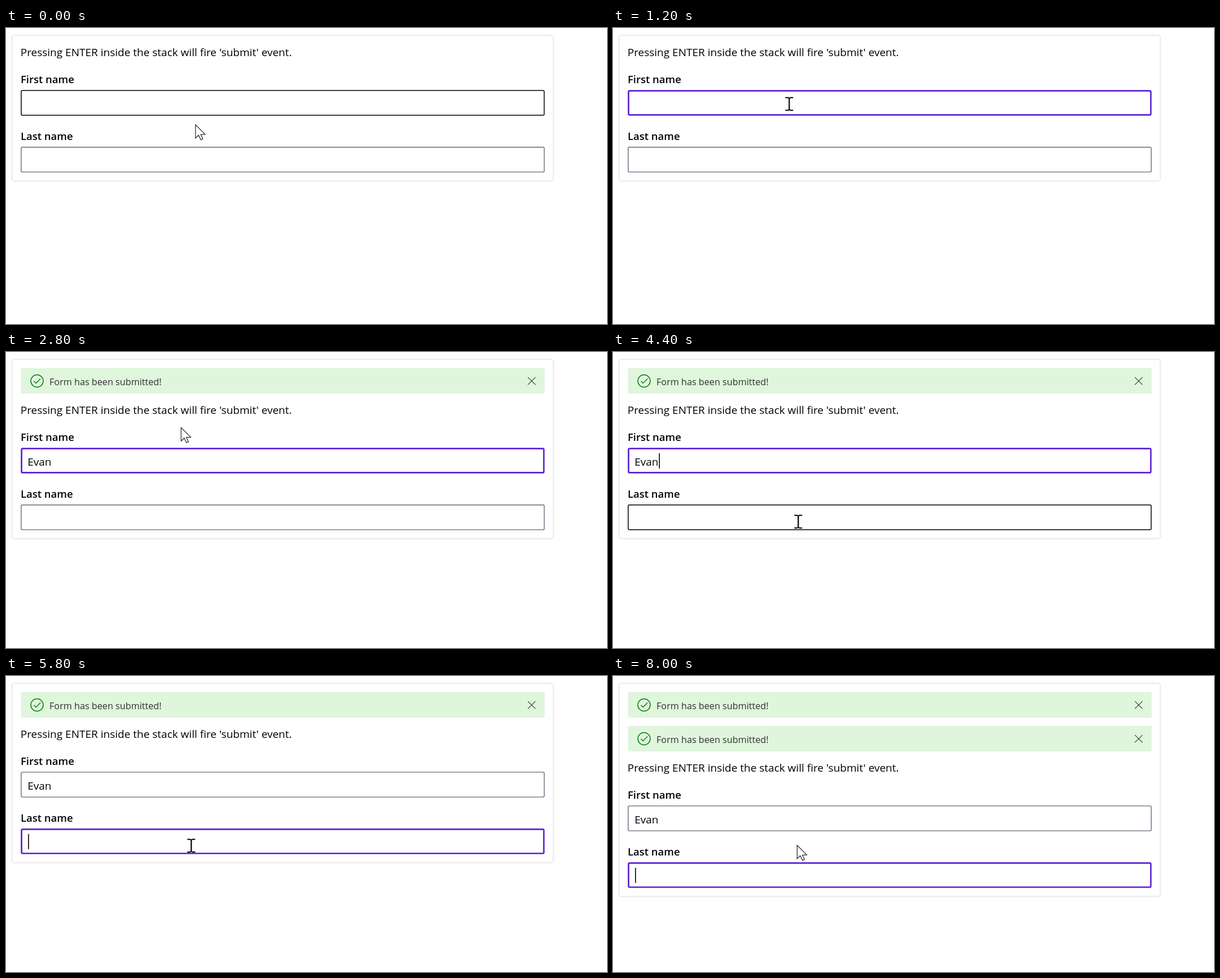
These frames come from a looping animation (1065x526 px, 8.2 s). An HTML page with a canvas:

```html
<!DOCTYPE html>
<html lang="en">
<head>
<meta charset="utf-8">
<title>Form submit</title>
<style>
  html, body { margin: 0; width: 100%; height: 100%; overflow: hidden; background: #fff; }
  canvas { display: block; }
</style>
</head>
<body>
<canvas id="stage" width="1065" height="526"></canvas>
<script>
const ctx = document.getElementById('stage').getContext('2d');
const LOOP = 8200, STEP = 200, ROW = 60;
const FAMILY = '"Open Sans", "Noto Sans", sans-serif';
const BODY = `19px ${FAMILY}`;
const LABEL = `600 18.5px ${FAMILY}`;
const NOTICE = `16.2px ${FAMILY}`;
const BORDER = {
  idle: ['#68667a', 1.4],
  hover: ['#000', 1.5],
  focus: ['#5b21d4', 2.7]
};
const FIRST_NAME = 'Evan';

// Pointer hot spot: [time, x, y]
const pointerPath = [
  [0, 335.5, 171.5], [200, 324, 152], [400, 314, 139], [600, 310, 134],
  [3600, 310, 134], [3800, 313, 195], [4000, 320, 265],
  [4200, 326, 339.5], [4400, 326, 300.5]
];
const caretToggles = [800, 1200, 1600, 2800, 3200, 3800, 4400, 4800,
  5000, 5400, 5800, 6400, 6800, 7400, 8000];

function pointerAt(t) {
  const next = pointerPath.findIndex(p => p[0] > t);
  if (next < 0) return pointerPath.at(-1).slice(1);
  const [t0, x0, y0] = pointerPath[next - 1];
  const [t1, x1, y1] = pointerPath[next];
  const k = (t - t0) / (t1 - t0);
  return [x0 + (x1 - x0) * k, y0 + (y1 - y0) * k];
}

function text(string, x, y, font, color = '#000') {
  ctx.font = font;
  ctx.fillStyle = color;
  ctx.fillText(string, x, y);
}

function line(points, color, width, closed) {
  ctx.beginPath();
  points.forEach(([x, y]) => ctx.lineTo(x, y));
  if (closed) ctx.closePath();
  ctx.strokeStyle = color;
  ctx.lineWidth = width;
  ctx.stroke();
}

function box(x, y, w, h, radius, color, width) {
  ctx.beginPath();
  ctx.roundRect(x + width / 2, y + width / 2, w - width, h - width, radius);
  ctx.strokeStyle = color;
  ctx.lineWidth = width;
  ctx.stroke();
}

function notice(y) {
  ctx.fillStyle = '#dff6dd';
  ctx.fillRect(26.5, y, 928, 45.5);
  const mid = y + 23;
  ctx.beginPath();
  ctx.arc(55, mid, 11, 0, Math.PI * 2);
  ctx.strokeStyle = '#107c10';
  ctx.lineWidth = 1.5;
  ctx.stroke();
  line([[49.5, mid + 0.3], [53.2, mid + 4], [61, mid - 4]], '#107c10', 1.5);
  text('Form has been submitted!', 77, y + 30, NOTICE, '#323130');
  line([[924.8, mid - 6.7], [938.2, mid + 6.7]], '#3b3a39', 1.2);
  line([[938.2, mid - 6.7], [924.8, mid + 6.7]], '#3b3a39', 1.2);
}

function field(label, y, state, value, caret) {
  text(label, 26, y + 98, LABEL);
  box(26.2, y + 110.2, 928.2, 45.6, 2, ...BORDER[state]);
  text(value, 38.2, y + 142, BODY);
  if (caret) {
    ctx.fillStyle = '#000';
    ctx.fillRect(39.1 + ctx.measureText(value).width, y + 120, 1.6, 27);
  }
}

function arrow(x, y) {
  ctx.save();
  ctx.translate(x, y);
  const outline = [[0.3, 0.4], [0.3, 24.2], [5.8, 19], [9.8, 27.3],
    [13.3, 25.6], [9.6, 17.7], [17.4, 17.4]];
  ctx.beginPath();
  outline.forEach(([px, py]) => ctx.lineTo(px, py));
  ctx.closePath();
  ctx.fillStyle = '#fff';
  ctx.fill();
  line(outline, '#111', 1.1, true);
  ctx.restore();
}

function beam(x, y) {
  ctx.save();
  ctx.translate(x + 2.3, y + 1);
  line([[0, -10.5], [0, 10.5]], '#000', 2.2);
  for (const side of [-1, 1]) {
    line([[-7, side * 11.2], [-2, side * 11.2], [0, side * 10],
      [2, side * 11.2], [7, side * 11.2]], '#000', 1.9);
  }
  ctx.restore();
}

function draw(t) {
  const notices = (t >= 2600) + (t >= 6000);
  const shift = notices * ROW;
  const [x, y] = pointerAt(t);
  const inside = top => y > top + 110 && y < top + 156;
  const overFirst = inside(shift), overLast = inside(shift + 100.8);
  const focus = t >= 5000 ? 'last' : t >= 800 ? 'first' : '';
  const caret = caretToggles.filter(at => at <= t).length % 2 === 1;
  const typed = Math.max(0, Math.min(4, Math.floor((t - 1400) / STEP)));

  ctx.fillStyle = '#fff';
  ctx.fillRect(0, 0, 1065, 526);
  box(9.3, 11.7, 962, 261.5 + shift, 5, '#eee', 2.6);
  for (let i = 0; i < notices; i++) notice(28.5 + i * ROW);
  text("Pressing ENTER inside the stack will fire 'submit' event.", 25.7, 50 + shift, BODY);

  const firstState = focus === 'first' ? 'focus' : !focus || overFirst ? 'hover' : 'idle';
  const lastState = focus === 'last' ? 'focus' : overLast ? 'hover' : 'idle';
  field('First name', shift, firstState, FIRST_NAME.slice(0, typed), caret && focus === 'first');
  field('Last name', shift + 100.8, lastState, '', caret && focus === 'last');

  (overFirst || overLast ? beam : arrow)(x, y);
}

function tick(now) {
  draw(Math.floor(now % LOOP / STEP) * STEP);
  requestAnimationFrame(tick);
}
requestAnimationFrame(tick);
</script>
</body>
</html>
```
